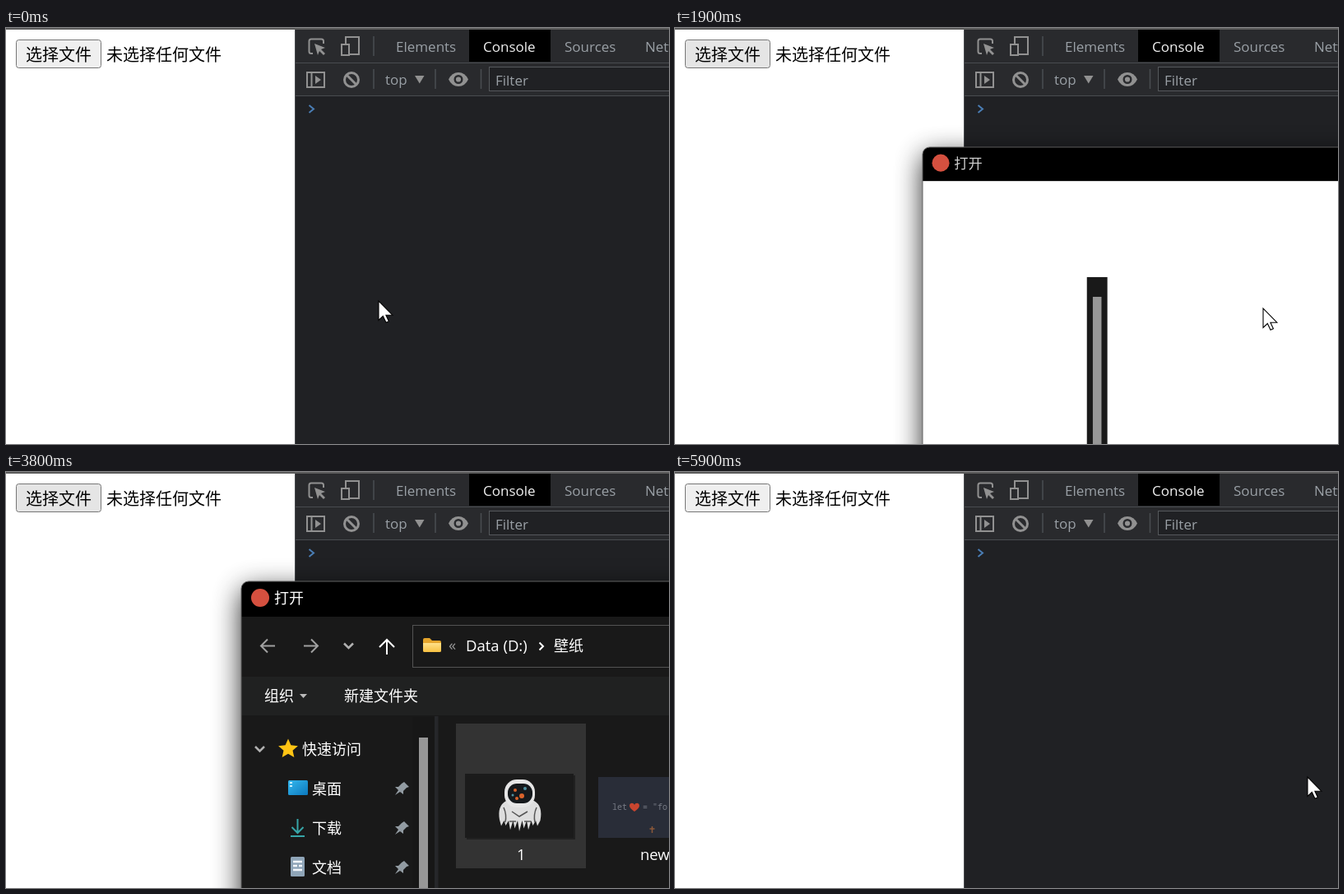
Recreate the animation shown at these times as an HTML page. Size 806 px wide and 506 px high, loop 6 s.

```html
<!DOCTYPE html>
<html lang="zh-CN">
<head>
<meta charset="utf-8">
<title>File picker demo</title>
<style>
  html, body { margin: 0; width: 100%; height: 100%; overflow: hidden; background: #fff; }
  svg { display: block; width: 100vw; height: 100vh; }
  text { white-space: pre; }
  .page { font: 20px "Liberation Sans", "Noto Sans CJK SC", "Noto Sans CJK", sans-serif; fill: #000; }
  .tools { font: 17px "Open Sans", "Noto Sans", sans-serif; fill: #9aa0a6; }
  .log { font: 16.5px "Noto Sans Mono", "DejaVu Sans Mono", monospace; fill: #e8e8e8; }
  .zh { font: 18px "Noto Sans CJK SC", "Noto Sans CJK", sans-serif; fill: #fff; }
  .en { font: 18.5px "Open Sans", "Noto Sans", sans-serif; fill: #fff; }
  .code { font: 10px "Noto Sans Mono", monospace; fill: #777b85; }
  .line { fill: none; stroke: #919191; stroke-width: 2; }
</style>
</head>
<body>
<svg viewBox="0 0 806 506" preserveAspectRatio="none">
  <defs>
    <filter id="blur" filterUnits="userSpaceOnUse" x="200" y="50" width="900" height="760">
      <feGaussianBlur stdDeviation="17"/>
    </filter>
    <linearGradient id="screen" x2="1" y2="1">
      <stop stop-color="#35b8ee"/><stop offset="1" stop-color="#0b78bd"/>
    </linearGradient>
    <linearGradient id="folderFill" x2="0" y2="1">
      <stop stop-color="#ffe08a"/><stop offset="1" stop-color="#f7c142"/>
    </linearGradient>
    <path id="pin" d="M3-8l6 6-3 1-4 4v4L-2 4l-6 4 4-6-4-4h4l4-4z" fill="#929ba2"/>
    <clipPath id="frame"><rect x="286" y="133" width="714" height="570" rx="9"/></clipPath>
  </defs>

  <!-- Page -->
  <rect width="806" height="506" fill="#fff"/>
  <rect id="button" x="12.5" y="14.5" width="103" height="34" rx="3" stroke="#767676"/>
  <text class="page" x="24" y="40">选择文件</text>
  <text class="page" id="chosen" x="122" y="40"></text>

  <!-- Developer tools -->
  <rect x="351" width="455" height="506" fill="#202124"/>
  <rect x="352" width="454" height="82" fill="#292a2d"/>
  <path d="M351.5 0V506M352 42.5H806M352 82.5H806" stroke="#494c50" fill="none"/>
  <rect width="806" height="2" fill="#5c5c5c"/>
  <rect x="563" y="2" width="99" height="39" fill="#000"/>
  <g class="tools">
    <text x="474" y="29">Elements</text>
    <text x="580" y="29" fill="#fff" style="fill:#f1f1f1">Console</text>
    <text x="679" y="29">Sources</text>
    <text x="777" y="29">Network</text>
    <text x="461" y="69">top</text>
    <rect x="587.5" y="47.5" width="230" height="29" fill="#202124" stroke="#55585c"/>
    <text x="595" y="70">Filter</text>
  </g>
  <path d="M447 10V34M447 50V74M522 50V74M577.5 50V74" stroke="#4a4d51" stroke-width="1.5"/>
  <g class="line" stroke-width="1.7">
    <path d="M373 31h-2q-2.500 0-2.500-2.500V16q0-2.500 2.500-2.500h12.500q2.500 0 2.500 2.500v3"/>
    <path d="M375 19l13 5-5 2 5 5-2 2-5-5-2 5z" fill="#919191" stroke="none"/>
    <path d="M413 20V11h16v21h-11M408 20h9v13h-9z"/>
    <path d="M366 54h21v18h-21zM371.500 54v18"/>
    <path d="M376 58l7 5-7 5z" fill="#919191" stroke="none"/>
    <circle cx="420" cy="63" r="8.500" stroke-width="3"/>
    <path d="M414 57l12 12" stroke-width="3"/>
    <path d="M497 58h11.500l-5.750 9.500z" fill="#919191" stroke="none"/>
  </g>
  <path d="M538 62.500q4-8.500 12-8.500t12 8.500q-4 8.500-12 8.500t-12-8.500z" fill="#919191"/>
  <circle cx="550" cy="62.500" r="4.300" fill="#919191" stroke="#292a2d" stroke-width="2.400"/>
  <g id="log">
    <text class="log" x="389" y="105">blob:<tspan text-decoration="underline">http://127.0.0.1:5501/be6cff4f-df41-4</tspan></text>
    <path d="M352 113.500H806" stroke="#3c3e41"/>
  </g>
  <path id="prompt" d="M368.500 94l5.500 4.500-5.500 4.500" fill="none" stroke="#4a7db4" stroke-width="2"/>

  <!-- Open dialog -->
  <g id="dialog">
    <rect x="286" y="143" width="714" height="570" rx="9" opacity=".85" filter="url(#blur)"/>
    <g clip-path="url(#frame)">
      <rect x="286" y="133" width="714" height="570" fill="#000"/>
      <circle cx="309" cy="153" r="11" fill="#d5503f"/>
      <text class="zh" id="heading" x="326" y="160">打开</text>
      <rect id="blank" x="286" y="176" width="714" height="527" fill="#fff"/>
      <g id="content">
        <rect x="286" y="176" width="714" height="527" fill="#191919"/>
        <rect x="286" y="249" width="714" height="47" fill="#202121"/>
        <rect x="521" y="297" width="4.500" height="406" fill="#26272a"/>
        <rect x="494.500" y="186.500" width="400" height="51" fill="#191919" stroke="#535353"/>
        <g class="line">
          <path d="M327 211.500h-17m8-8l-8 8 8 8M362 211.500h17m-8-8l8 8-8 8" stroke="#a0a0a0"/>
          <path d="M411 208.500l5.500 5.500 5.500-5.500M303 334l5.500 5.500 5.500-5.500" stroke="#b0b0b0" stroke-width="2.500"/>
          <path d="M463 222v-18m-9 9l9-9 9 9M648.500 207.500l4.500 4.500-4.500 4.500" stroke="#fff"/>
        </g>
        <path d="M507 204q0-2 2-2h6l3 3h9q2 0 2 2v10q0 2-2 2h-18q-2 0-2-2z" fill="#e5a52c"/>
        <path d="M507 208h22v9q0 2-2 2h-18q-2 0-2-2z" fill="url(#folderFill)"/>
        <text class="en" x="538" y="217" style="fill:#999">«</text>
        <text class="en" x="559" y="218">Data (D:)</text>
        <text class="zh" x="666" y="218">壁纸</text>
        <g id="commands">
          <text class="zh" x="314" y="279">组织</text>
          <path d="M357 270h9l-4.500 5z" fill="#bbb"/>
          <text class="zh" x="411" y="279">新建文件夹</text>
        </g>
        <path id="star" fill="#ffc414"/>
        <text class="zh" x="360" y="344">快速访问</text>
        <rect x="343" y="375" width="24" height="18" rx="1.500" fill="url(#screen)"/>
        <path d="M345 378h3m-3 4h3" stroke="#c8efff" stroke-width="2"/>
        <text class="zh" x="372" y="392">桌面</text>
        <path d="M354.500 422v17m-7-7l7 7 7-7M346 443h17" fill="none" stroke="#37a6a8" stroke-width="2"/>
        <text class="zh" x="372" y="440">下载</text>
        <rect x="346" y="468" width="17" height="24" rx="1.500" fill="#8fa5b8"/>
        <path d="M349 474h11M349 479h5m2 0h4M349 484h11" stroke="#f2f6fa" stroke-width="2.500"/>
        <text class="zh" x="372" y="488">文档</text>
        <use href="#pin" x="481" y="385"/><use href="#pin" x="481" y="433"/><use href="#pin" x="481" y="481"/>
        <rect id="selection" x="547" y="306" width="158" height="176"/>
        <rect x="560" y="369" width="132" height="78" fill="#000" opacity=".35"/>
        <rect x="558" y="367" width="132" height="78" fill="#1b1b1b"/>
        <g>
          <path id="suit" fill="#dedede"/>
          <path d="M605 408q4 9 2 18M645 408q-4 9-2 18M615 413l9 6 10-6M612 425h8m10 0h8" fill="none" stroke="#555" stroke-width="1.500"/>
          <rect x="606" y="374" width="37" height="34" rx="15" fill="#e6e6e6"/>
          <rect x="610" y="379" width="30" height="24" rx="11" fill="#15191c"/>
          <g fill="#d9632b"><circle cx="619" cy="387" r="2"/><circle cx="627" cy="394" r="3"/><circle cx="621" cy="397" r="2"/></g>
          <g fill="#4f91a0"><circle cx="631" cy="385" r="2"/><circle cx="616" cy="393" r="1.500"/></g>
        </g>
        <text class="en" x="621" y="472">1</text>
        <rect x="720" y="371" width="132" height="74" fill="#292d38"/>
        <text class="code" x="737" y="411">let</text>
        <path d="M764 413q-6-4-6-7c0-4 5-4 6-1 1-3 6-3 6 1q0 3-6 7z" fill="#c9452f"/>
        <text class="code" x="774" y="411">= "fo</text>
        <path d="M785.500 431v8m-3-5h6" stroke="#8d5939" stroke-width="1.500"/>
        <text class="en" x="771" y="472">new</text>
      </g>
      <rect id="track" x="494.500" y="298" width="26" height="405" fill="#171717"/>
      <rect x="502" y="323" width="11" height="380" fill="#979797"/>
    </g>
    <rect x="286" y="133" width="714" height="570" rx="9" fill="none" stroke="#626262"/>
  </g>

  <path id="cursor" d="M0 0V23.500L5.300 18.500 9 26.300 12.400 24.800 8.900 17.200H16.800Z" fill="#fff" stroke="#000" stroke-width="1.100"/>
</svg>
<script>
const LOOP = 6000, STEP = 100;
const $ = id => document.getElementById(id);
const set = (id, attrs) => Object.entries(attrs).forEach(([k, v]) => $(id).setAttribute(k, v));
const show = (id, on) => set(id, { visibility: on ? "inherit" : "hidden" });

// Each entry: time, x, y
const cursorPath = [
  [0, 453, 332], [300, 425, 240], [700, 357, 75], [800, 235, 55], [900, 125, 47], [1000, 80, 48],
  [1200, 68, 35], [1500, 68, 35], [1700, 400, 190], [1900, 715, 341], [2000, 682, 318],
  [2100, 622, 286], [2300, 618, 395], [2500, 620, 402], [2800, 830, 455], [2900, 900, 600],
  [5000, 900, 600], [5100, 784, 482], [5400, 771, 376], [5700, 770, 373], [5900, 769, 371], [6000, 769, 371]
];
// Each entry: time, scale, opacity
const dialogPath = [
  [0, .9, 0], [1700, .9, 0], [1800, .925, .5], [1900, .958, 1], [2000, .988, 1], [2100, 1, 1],
  [4000, 1, 1], [4100, .97, .6], [4200, .93, .2], [4300, .9, 0], [6000, .9, 0]
];

function sample(keys, t) {
  const i = Math.max(1, keys.findIndex(k => k[0] >= t));
  const [a, b] = [keys[i - 1], keys[i]];
  const p = (t - a[0]) / (b[0] - a[0]);
  return [1, 2].map(n => a[n] + (b[n] - a[n]) * p);
}

function starPath(cx, cy, outer, inner) {
  const points = Array.from({ length: 10 }, (_, i) => {
    const r = i % 2 ? inner : outer, a = i * Math.PI / 5 - Math.PI / 2;
    return `${cx + r * Math.cos(a)} ${cy + r * Math.sin(a)}`;
  });
  return `M${points.join("L")}Z`;
}

function suitPath() {
  let d = "M608 400Q597 406 600 423";
  for (let i = 0; i < 9; i++) {
    const x = 600 + i * 5.5, drop = 429 + 8 * Math.sin((i + .5) / 9 * Math.PI) - i % 2 * 3;
    d += `L${x + 2} ${drop}L${x + 5.5} 424`;
  }
  return d + "Q653 406 642 400Z";
}

function render(now) {
  const t = Math.floor(now % LOOP / STEP) * STEP;
  const between = (a, b) => t >= a && t < b;
  const picked = between(4300, 5700);

  set("button", { fill: between(1100, 4300) ? "#e5e5e5" : "#efefef" });
  $("chosen").textContent = picked ? "1.png" : "未选择任何文件";
  show("log", picked);
  set("prompt", { transform: `translate(0 ${picked ? 30 : 0})` });

  const [scale, opacity] = sample(dialogPath, t);
  set("dialog", {
    opacity,
    transform: `translate(643 418) scale(${scale}) translate(-643 -418)`
  });
  show("dialog", opacity > 0);
  show("content", t >= 2000);
  show("commands", t >= 2200);
  $("heading").style.fill = t < 2000 ? "#d0d0d0" : "#fff";
  set("track", { fill: t < 2000 ? "#191919" : "#171717" });
  show("selection", t >= 2300);
  set("selection", { fill: t < 2400 ? "#4d4d4d" : t < 3800 ? "#777" : "#333" });

  const [x, y] = sample(cursorPath, t);
  set("cursor", { transform: `translate(${x} ${y})` });
}

set("star", { d: starPath(343, 337, 12.5, 5.8) });
set("suit", { d: suitPath() });

const start = performance.now();
function tick() {
  render(performance.now() - start);
  requestAnimationFrame(tick);
}
tick();
</script>
</body>
</html>
```
